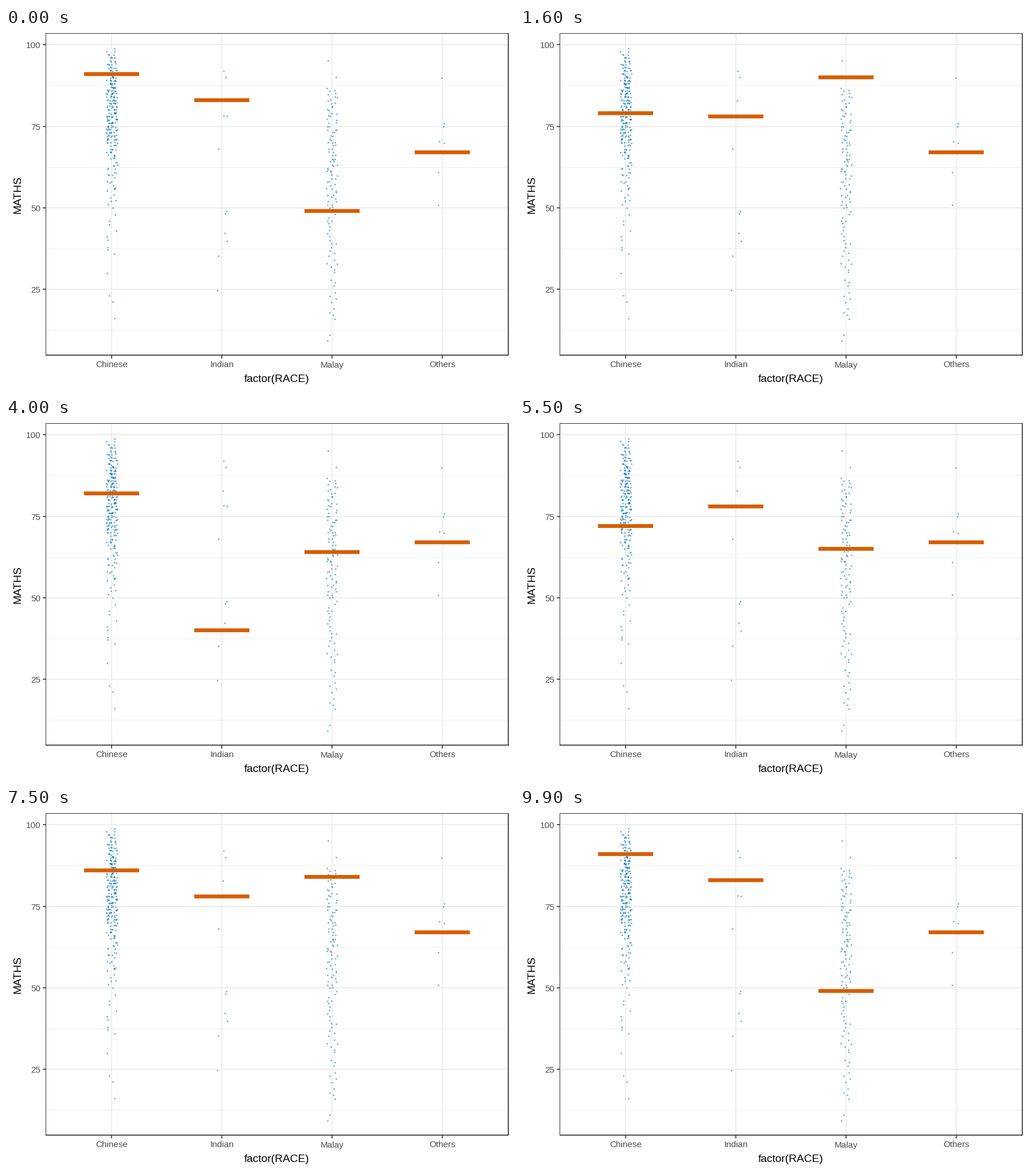
Recreate the animation shown at these times as a matplotlib script. Size 885 by 632 pixels, loop 10 s.

```python
import numpy as np
import matplotlib.pyplot as plt
from matplotlib.animation import FuncAnimation
from matplotlib.patches import Rectangle

WIDTH, HEIGHT, DPI = 885, 632, 64
PT = 72 / DPI                      # points per pixel
LEFT, TOP, RIGHT, BOTTOM = 69, 9, 876, 572
GROUPS = ["Chinese", "Indian", "Malay", "Others"]
CENTERS = [184 + 192 * i for i in range(4)]
BAR_W, BAR_H = 96, 6.7
HOLD = 4                           # frames per draw: three at rest, one halfway

# One sampled score per group in each draw.
DRAWS = np.array([
    (91, 83, 49, 67), (79, 92, 65, 67), (82, 78, 52, 75), (93, 83, 75, 70),
    (79, 78, 90, 67), (78, 83, 65, 51), (23, 48, 58, 67), (62, 49, 21, 61),
    (79, 78, 41, 67), (96, 35, 66, 75), (82, 40, 64, 67), (90, 78, 66, 70),
    (78, 35, 58, 75), (80, 92, 53, 70), (72, 78, 65, 67), (86, 78, 66, 51),
    (78, 35, 66, 51), (90, 49, 58, 70), (78, 40, 65, 75), (86, 78, 84, 67),
    (91, 25, 58, 67), (78, 92, 31, 70), (97, 49, 64, 70), (80, 68, 75, 75),
    (78, 78, 74, 70),
])

# Small groups: (sideways offset in px, score).
INDIAN = [(2.5, 92), (7, 90), (2, 82.8), (3, 78.2), (9, 78.1), (-6, 68.1),
          (8, 48.9), (5.5, 48.2), (4.5, 42.3), (8.5, 39.7), (-6, 35.2),
          (-8, 24.7)]
OTHERS = [(-1, 89.8), (3, 75.8), (2, 74.9), (-5, 70.3), (3, 69.8), (5, 67.1),
          (2, 66.7), (-7, 60.9), (-7.5, 50.8)]

# Large groups: score at a few ranks, counted from the lowest.
CHINESE = {0: 16.3, 1: 21.4, 2: 22.8, 3: 29.8, 4: 36, 8: 41, 13: 50, 19: 55,
           29: 60, 42: 65, 61: 70, 99: 75, 177: 85, 219: 90, 245: 95,
           255: 98, 256: 99}
MALAY = {0: 9.2, 1: 11.2, 2: 16, 9: 24, 13: 30, 20: 36, 35: 49, 54: 59,
         69: 65, 100: 79, 115: 87, 116: 90, 117: 95.3}


def y_of(score):
    return 29.25 + 5.69 * (100 - score)


def spread(ranks, rng):
    """Whole scores between the given ranks, jittered both ways."""
    count = max(ranks) + 1
    scores = np.interp(np.arange(count), list(ranks), list(ranks.values()))
    scores = np.round(scores) + rng.uniform(-0.25, 0.25, count)
    return np.column_stack([rng.uniform(-9.7, 9.7, count), scores])


fig = plt.figure(figsize=(WIDTH / DPI, HEIGHT / DPI), dpi=DPI, facecolor="white")
ax = fig.add_axes([0, 0, 1, 1])
ax.set_xlim(0, WIDTH)
ax.set_ylim(HEIGHT, 0)
ax.axis("off")


def line(x0, y0, x1, y1, color, width, z):
    ax.plot([x0, x1], [y0, y1], color=color, lw=width * PT,
            solid_capstyle="butt", zorder=z)


def box(x, y, w, h, color, z):
    return ax.add_patch(Rectangle((x, y), w, h, fc=color, lw=0, zorder=z,
                                  snap=False))


def label(x, y, text, size, color, ha="center", rotation=0):
    ax.text(x, y, text, fontsize=size * PT, color=color, ha=ha, va="baseline",
            rotation=rotation, rotation_mode="anchor", family="Liberation Sans")


GRID, DARK, GREY = "#EBEBEB", "#333333", "#4D4D4D"

for score in np.arange(25, 101, 25):
    y, minor = y_of(score), y_of(score - 12.5)
    line(LEFT, minor, RIGHT, minor, GRID, 0.8, 1)
    line(LEFT, y, RIGHT, y, GRID, 1.6, 1)
    line(64, y, LEFT, y, DARK, 1.6, 5)
    label(60, y + 6, str(score), 15.3, GREY, ha="right")
for x, name in zip(CENTERS, GROUPS):
    line(x, TOP, x, BOTTOM, GRID, 1.6, 1)
    line(x, BOTTOM, x, BOTTOM + 4.5, DARK, 1.6, 5)
    label(x, 592.5, name, 15.3, GREY)

label(472, 618, "factor(RACE)", 19.1, "black")
label(25.5, 291, "MATHS", 19.1, "black", rotation=90)

rng = np.random.default_rng(7)
groups = [spread(CHINESE, rng), INDIAN, spread(MALAY, rng), OTHERS]
for x, points in zip(CENTERS, groups):
    offsets, scores = np.transpose(points)
    ax.scatter(x + offsets, y_of(scores), s=(2.7 * PT) ** 2, color="#0072B2",
               alpha=0.6, linewidths=0, zorder=2)
bars = [box(x - BAR_W / 2, 0, BAR_W, BAR_H, "#D55E00", 3) for x in CENTERS]

# Panel border: the upper and left edges are half clipped.
box(LEFT, TOP, 1, BOTTOM - TOP, DARK, 4)
box(LEFT, TOP, RIGHT - LEFT, 1, DARK, 4)
box(RIGHT - 1.7, TOP, 1.7, BOTTOM - TOP, DARK, 4)
box(LEFT, BOTTOM - 1.7, RIGHT - LEFT, 1.7, DARK, 4)


def update(frame):
    # The draw in the middle of the loop rests one frame less.
    step, phase = divmod(frame + (frame >= 50), HOLD)
    scores = DRAWS[step % len(DRAWS)]
    if phase == HOLD - 1:
        scores = (scores + DRAWS[(step + 1) % len(DRAWS)]) / 2
    for bar, score in zip(bars, scores):
        bar.set_y(y_of(score) - BAR_H / 2)
    return bars


anim = FuncAnimation(fig, update, frames=100, interval=100, repeat=True,
                     repeat_delay=0, init_func=lambda: update(0))
plt.show()
```
